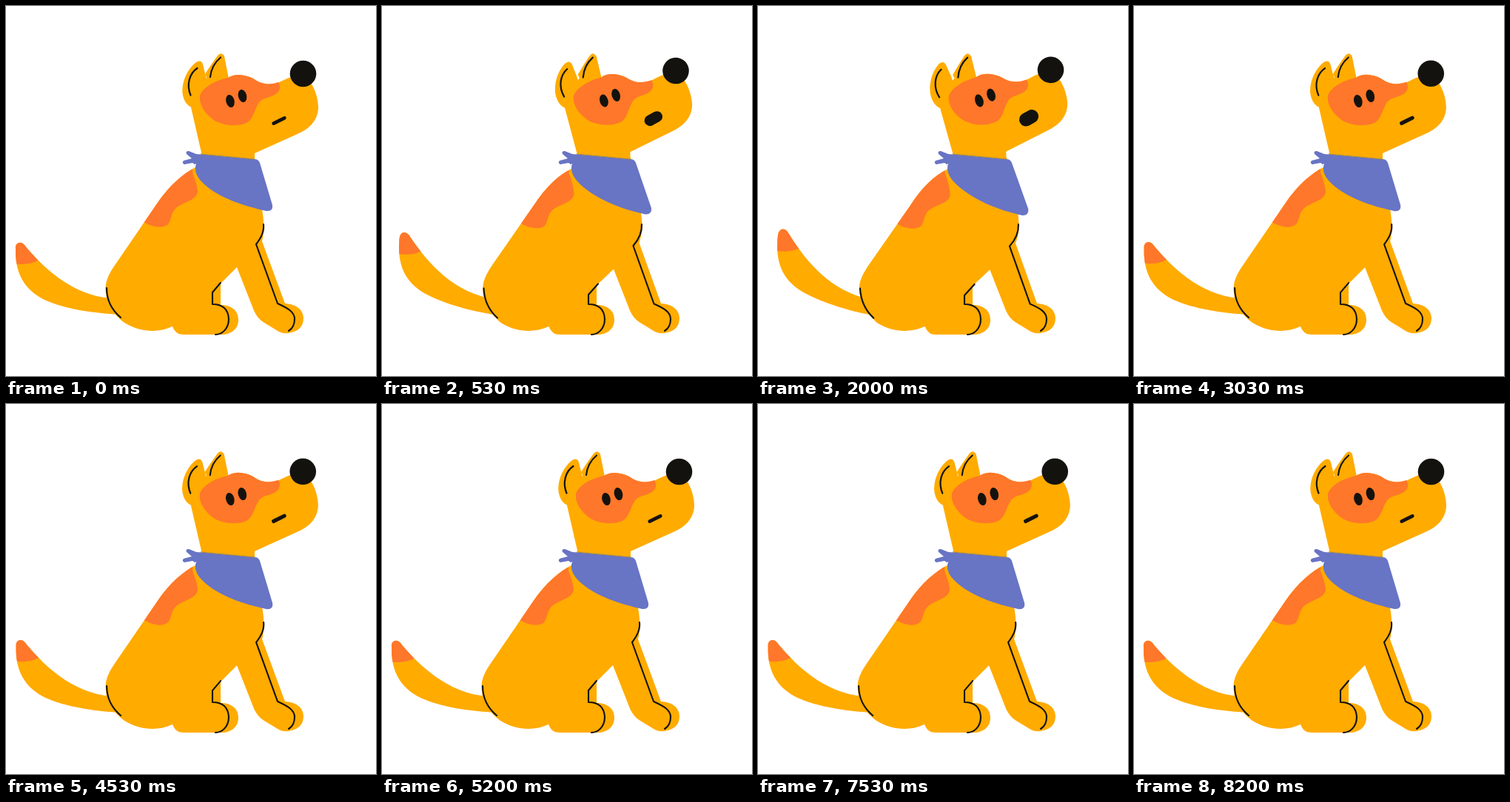
Animation, 500 px wide and 500 px high, one loop 9.01 s. Source, as an HTML page with a canvas:

```html
<!DOCTYPE html>
<html lang="en">
<head>
<meta charset="utf-8">
<title>Barking dog</title>
<style>
  html, body { margin: 0; width: 100%; height: 100%; overflow: hidden; background: #fff; }
  canvas { display: block; width: 100%; height: 100%; }
</style>
</head>
<body>
<canvas id="stage"></canvas>
<script>
const SIZE = 500, LOOP = 9010, CYCLE = 4500;
const BARKS = [0, 750, 1500, 3000];
const BARK_PEAK = 370, BARK_END = 680;
const FUR = '#ffab00', SPOT = '#ff772a', SCARF = '#6874c4', SCARF_EDGE = '#9a8a55', INK = '#14120e';

const canvas = document.getElementById('stage');
const ctx = canvas.getContext('2d');
const ratio = window.devicePixelRatio || 1;
canvas.width = canvas.height = SIZE * ratio;

// Each moving shape: [sitting, barking]
const HIND_PAW = 'L279 403 C289 403 300 406 301 423 C301 436 292 444 283 444';
const FRONT_PAW = 'C380 408 390 413 390 423 C390 431 387 436 382 439';
const FEET = 'L291 444 C305 444 314 436 314 424 C314 411 304 404 290 404 ';
const FRONT_FOOT = 'L334 409 C337 417 342 424 349 428 L367 439 C373 443 380 443 386 441 C396 439 402 432 402 422 C402 411 393 403 377 402 ';
const KNOT = 'L255 214 L252 212 L241 214 Q237 212 240 209 L251 206 L244 200 Q242 196 247 196 L257 200Z';

const shapes = {
  body: [
    'M256 218 C240 226 221 242 204 267 L150 346 C137 364 133 375 135 388 C136 402 146 418 160 428 C181 441 206 442 225 433 C228 441 233 444 240 444 '
      + FEET + 'L290 375 L312 353 ' + FRONT_FOOT + 'L346 318 C349 305 349 292 346 275 L336 205 L264 200Z',
    'M256 222 C240 229 223 245 206 272 L155 344 C143 361 137 372 138 385 C140 401 148 415 161 428 C181 441 206 442 226 433 C229 441 234 444 240 444 '
      + FEET + 'L290 380 L314 358 ' + FRONT_FOOT + 'L349 322 C355 310 356 300 354 283 L336 205 L264 200Z'
  ],
  backSpot: [
    'M252 220 L225 220 L180 289 L188 293 C198 299 212 301 219 295 C225 287 222 277 234 270 C244 264 256 262 259 252 C259 243 255 234 252 225Z',
    'M253 222 L226 222 L182 292 L190 296 C200 302 214 304 221 299 C227 290 224 281 236 275 C246 269 258 268 260 258 C260 247 256 235 253 226Z'
  ],
  tail: [
    'M13 328 C12 320 20 317 25 323 C48 351 88 391 142 395 L152 417 C120 415 80 410 52 397 C24 383 12 360 13 328Z',
    'M34 302 C36 291 43 289 48 296 C66 330 92 374 143 394 L155 418 C122 410 84 394 62 379 C38 362 29 340 34 302Z'
  ],
  tailTip: [
    'M0 300 L60 300 L43 344 Q30 351 10 348Z',
    'M10 280 L75 285 L63 319 Q48 325 29 321Z'
  ],
  scarf: [
    'M257 200 L336 207 Q341 207 343 212 L360 269 Q361 278 352 277 C320 270 288 259 268 241 C257 231 254 222 257 213 ' + KNOT,
    'M257 200 L336 207 Q341 207 343 212 L368 277 Q369 286 360 286 C325 279 291 262 270 243 C258 232 254 222 257 213 ' + KNOT
  ],
  hip: ['M136 381 Q136 405 155 421', 'M139 382 Q141 407 157 422'],
  hindLeg: ['M290 374 L279 387 ' + HIND_PAW, 'M294 377 L279 393 ' + HIND_PAW],
  frontLeg: [
    'M348 295 C349 306 344 314 338 322 L367 402 ' + FRONT_PAW,
    'M354 295 C354 306 349 318 341 326 L368 403 ' + FRONT_PAW
  ]
};

const head = new Path2D('M264 212 L264 198 L250 137 L262 106 L271 97 L300 97 C310 90 324 93 334 98 C345 106 355 107 366 104 C373 102 378 98 386 96 L412 104 C418 113 422 126 422 138 C421 156 409 166 396 172 L336 199 L336 212Z');
const faceSpot = new Path2D('M262 122 C264 112 280 101 300 97 C310 90 324 93 334 98 C345 106 355 107 368 103 C371 107 371 113 367 117 C359 125 347 122 341 132 C335 142 334 153 325 158 C311 164 293 161 282 155 C269 146 261 134 262 122Z');
const leftEar = new Path2D('M251 137 C244 134 240 128 238.5 118 C237 103 245 85 257 76 Q264 72 266 79 L270 95 L275 125Z');
const leftEarLine = new Path2D('M258.5 84 C248 91 243.5 106 249.5 120.5');
const rightEar = new Path2D('M269 92 C274 84 280 75 286 67 Q291 61 295 68 L301 98 L275 105Z');
const rightEarLine = new Path2D('M290 69.5 C281 77 277 86 276 96');
const scarfEdge = new Path2D('M263 200 L336 207');

// Outer end and inner end of each sound line
const SOUND = [
  [488.5, 61.5, 456, 78],
  [487.5, 120, 452, 120],
  [480.5, 179, 450, 159]
];

const lerp = (a, b, k) => a + (b - a) * k;
const clamp01 = v => Math.min(1, Math.max(0, v));

function morph([from, to], k) {
  const goal = to.match(/\d+/g);
  let i = 0;
  return new Path2D(from.replace(/\d+/g, n => lerp(+n, +goal[i++], k).toFixed(2)));
}

function fill(path, color) {
  ctx.fillStyle = color;
  ctx.fill(path);
}

function stroke(path, width, color = INK) {
  ctx.strokeStyle = color;
  ctx.lineWidth = width;
  ctx.lineCap = 'round';
  ctx.lineJoin = 'round';
  ctx.stroke(path);
}

function fillInside(clip, path, color) {
  ctx.save();
  ctx.clip(clip);
  fill(path, color);
  ctx.restore();
}

function turn(x, y, angle) {
  ctx.translate(x, y);
  ctx.rotate(angle);
  ctx.translate(-x, -y);
}

function ellipse(x, y, rx, ry, angle = 0) {
  ctx.beginPath();
  ctx.ellipse(x, y, rx, ry, angle, 0, Math.PI * 2);
  ctx.fillStyle = INK;
  ctx.fill();
}

function drawBody(k) {
  const tail = morph(shapes.tail, k), body = morph(shapes.body, k);
  fill(tail, FUR);
  fillInside(tail, morph(shapes.tailTip, k), SPOT);
  fill(body, FUR);
  fillInside(body, morph(shapes.backSpot, k), SPOT);
  for (const name of ['hip', 'hindLeg', 'frontLeg']) stroke(morph(shapes[name], k), 2.1);
}

function drawMouth(k) {
  const w = lerp(10.5, 15.2, k), h = lerp(2.3, 12.6, k);
  ctx.save();
  ctx.translate(369, 155);
  ctx.rotate(-0.46);
  ctx.beginPath();
  ctx.roundRect(-w, -h, w * 2, h * 2, h);
  ctx.fillStyle = INK;
  ctx.fill();
  ctx.restore();
}

function drawHead(k) {
  ctx.save();
  turn(289, 215, -0.072 * k);

  ctx.save();
  turn(256, 121, -0.2 * k);
  fill(leftEar, FUR);
  stroke(leftEarLine, 2.2);
  ctx.restore();

  fill(rightEar, FUR);
  fill(head, FUR);
  fill(faceSpot, SPOT);
  stroke(rightEarLine, 2.2);
  ellipse(303, 128.5, 5.6, 8.7, -0.25);
  ellipse(319.5, 121.5, 5.6, 8.7, -0.25);
  drawMouth(k);
  ellipse(401.5, 91.5, 17.8, 17.8);
  ctx.restore();
}

function drawScarf(k) {
  fill(morph(shapes.scarf, k), SCARF);
  stroke(scarfEdge, 1.2, SCARF_EDGE);
}

function drawSound(time) {
  const front = clamp01((time - 200) / 130);
  const back = clamp01((time - 270) / 175);
  if (front <= back) return;
  for (const [x, y, x0, y0] of SOUND) {
    const line = new Path2D();
    line.moveTo(lerp(x0, x, back), lerp(y0, y, back));
    line.lineTo(lerp(x0, x, front), lerp(y0, y, front));
    stroke(line, 5.6);
  }
}

function barkAmount(time) {
  if (time <= 0 || time >= BARK_END) return 0;
  const half = time < BARK_PEAK
    ? time / BARK_PEAK
    : 1 + (time - BARK_PEAK) / (BARK_END - BARK_PEAK);
  return Math.sin(half * Math.PI / 2) ** 1.8;
}

function draw(now) {
  const t = Math.min(now % LOOP, 2 * CYCLE - 1) % CYCLE;
  // Poses are held in alternating short and long steps
  const step = Math.floor(t / 100) * 100 + (t % 100 >= 30 ? 33 : 0);
  const start = BARKS.filter(b => b <= step).pop();
  const time = step - start;
  const k = barkAmount(time);

  ctx.setTransform(ratio, 0, 0, ratio, 0, 0);
  ctx.fillStyle = '#fff';
  ctx.fillRect(0, 0, SIZE, SIZE);
  drawBody(k);
  drawHead(k);
  drawScarf(k);
  drawSound(time);
}

const begin = performance.now();
function tick() {
  draw(performance.now() - begin);
  requestAnimationFrame(tick);
}
tick();
</script>
</body>
</html>
```
